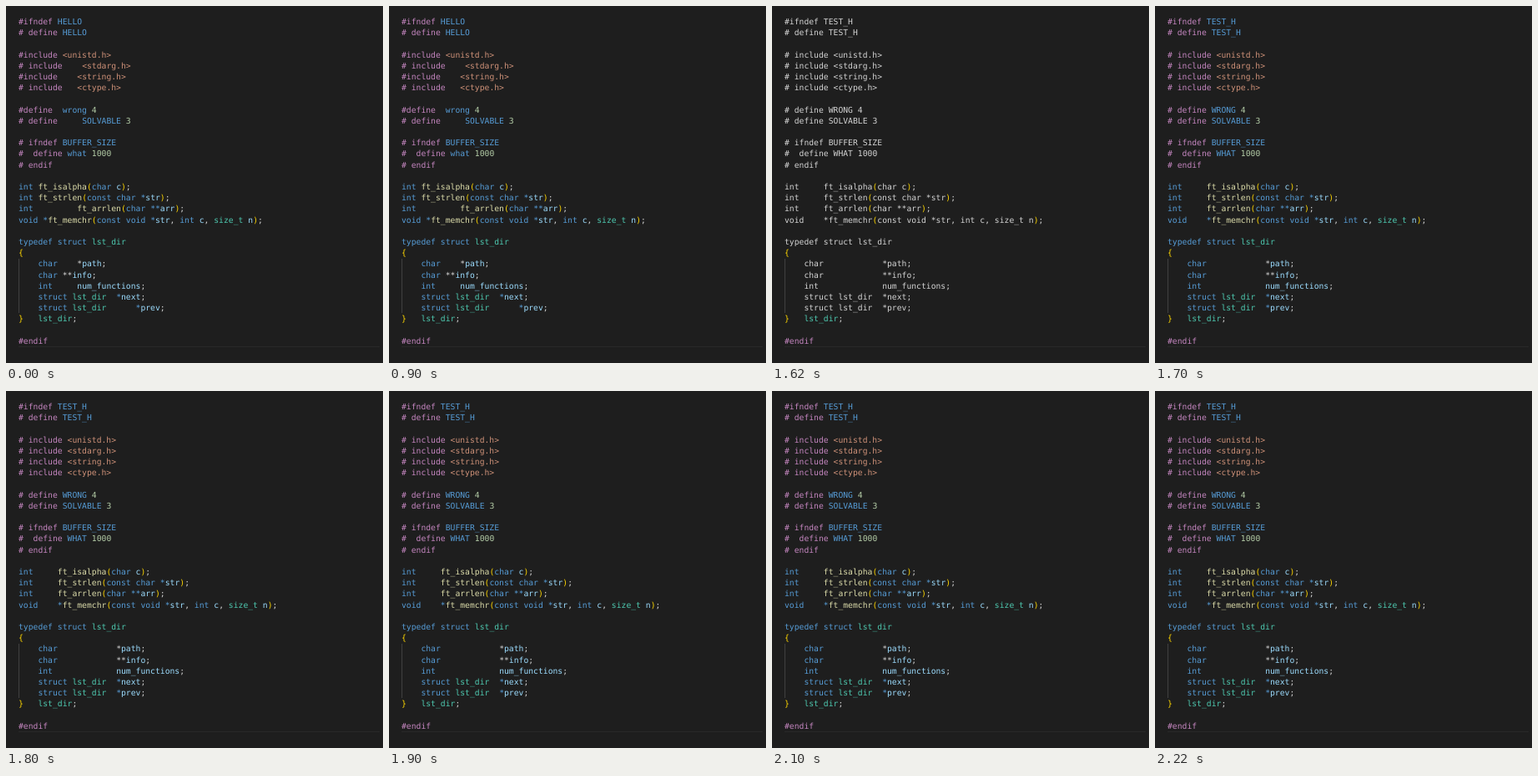
Animation, 452 px wide and 428 px high, one loop 2300 ms. Source, as an HTML page:

```html
<!DOCTYPE html>
<html lang="en">
<head>
<meta charset="utf-8">
<title>Header formatter</title>
<style>
  html, body { margin: 0; width: 100%; height: 100%; overflow: hidden; background: #1e1e1e; }
  svg { display: block; width: 452px; height: 428px; }
  text {
    font: 9.73px "DejaVu Sans Mono", "Liberation Mono", monospace;
    text-rendering: geometricPrecision;
    white-space: pre;
  }
  .view { opacity: 0; }
</style>
</head>
<body>
<svg id="stage" viewBox="0 0 452 428">
  <rect width="452" height="428" fill="#1e1e1e"/>
  <rect x="15" y="408" width="433" height="1" fill="#292929"/>
  <rect x="15" y="303" width="1" height="65" fill="#404040"/>
</svg>
<script>
const LEFT = 15, BASE = 22, COL = 5.857, ROW = 13.2, LOOP = 2300;
const C = {
  plain: '#d4d4d4', directive: '#c586c0', keyword: '#569cd6', string: '#ce9178',
  number: '#b5cea8', func: '#dcdcaa', type: '#4ec9b0', name: '#9cdcfe', bracket: '#ffd700'
};

const messy = `#ifndef HELLO
# define HELLO

#include <unistd.h>
# include    <stdarg.h>
#include    <string.h>
# include   <ctype.h>

#define  wrong 4
# define     SOLVABLE 3

# ifndef BUFFER_SIZE
#  define what 1000
# endif

int ft_isalpha(char c);
int ft_strlen(const char *str);
int         ft_arrlen(char **arr);
void *ft_memchr(const void *str, int c, size_t n);

typedef struct lst_dir
{
    char    *path;
    char **info;
    int     num_functions;
    struct lst_dir  *next;
    struct lst_dir      *prev;`;

const tidy = `#ifndef TEST_H
# define TEST_H

# include <unistd.h>
# include <stdarg.h>
# include <string.h>
# include <ctype.h>

# define WRONG 4
# define SOLVABLE 3

# ifndef BUFFER_SIZE
#  define WHAT 1000
# endif

int     ft_isalpha(char c);
int     ft_strlen(const char *str);
int     ft_arrlen(char **arr);
void    *ft_memchr(const void *str, int c, size_t n);

typedef struct lst_dir
{
    char            *path;
    char            **info;
    int             num_functions;
    struct lst_dir  *next;
    struct lst_dir  *prev;`;

const tail = `}   lst_dir;

#endif`;

const rules = [
  [/^(#|ifndef|define|include|endif)$/, 'directive'],
  [/^</, 'string'],
  [/^(int|char|const|void|struct|typedef)$/, 'keyword'],
  [/^(size_t|lst_dir)$/, 'type'],
  [/^ft_/, 'func'],
  [/^\d/, 'number'],
  [/^[(){}]$/, 'bracket']
];

function colorOf(token, line) {
  const rule = rules.find(([re]) => re.test(token));
  if (rule) return C[rule[1]];
  if (token[0] === '*') return /^ +char/.test(line) ? C.plain : C.keyword;
  if (/^\w/.test(token)) return line[0] === '#' ? C.keyword : C.name;
  return C.plain;
}

const uncolored = token => /^[(){}]$/.test(token) ? C.bracket : C.plain;

function make(tag, attrs, parent) {
  const el = document.createElementNS('http://www.w3.org/2000/svg', tag);
  for (const k in attrs) el.setAttribute(k, attrs[k]);
  return parent.appendChild(el);
}

function draw(code, parent, paint, firstRow = 0) {
  code.split('\n').forEach((line, i) => {
    for (const m of line.matchAll(/<[^>]+>|\w+|\*+|[^\s\w]/g)) {
      make('text', {
        x: LEFT + m.index * COL,
        y: BASE + (firstRow + i) * ROW,
        fill: paint(m[0], line)
      }, parent).textContent = m[0];
    }
  });
}

const stage = document.getElementById('stage');
draw(tail, stage, colorOf, 27);

// code, painter, start ms, end ms
const views = [
  [messy, colorOf, 0, 1500],
  [tidy, uncolored, 1500, 1700],
  [tidy, colorOf, 1700, LOOP]
].map(([code, paint, from, to]) => {
  const el = make('g', { class: 'view' }, stage);
  draw(code, el, paint);
  return { el, from, to };
});

const start = performance.now();
function tick() {
  const t = Math.max(0, performance.now() - start) % LOOP;
  for (const v of views) v.el.style.opacity = t >= v.from && t < v.to ? 1 : 0;
  requestAnimationFrame(tick);
}
tick();
</script>
</body>
</html>
```
